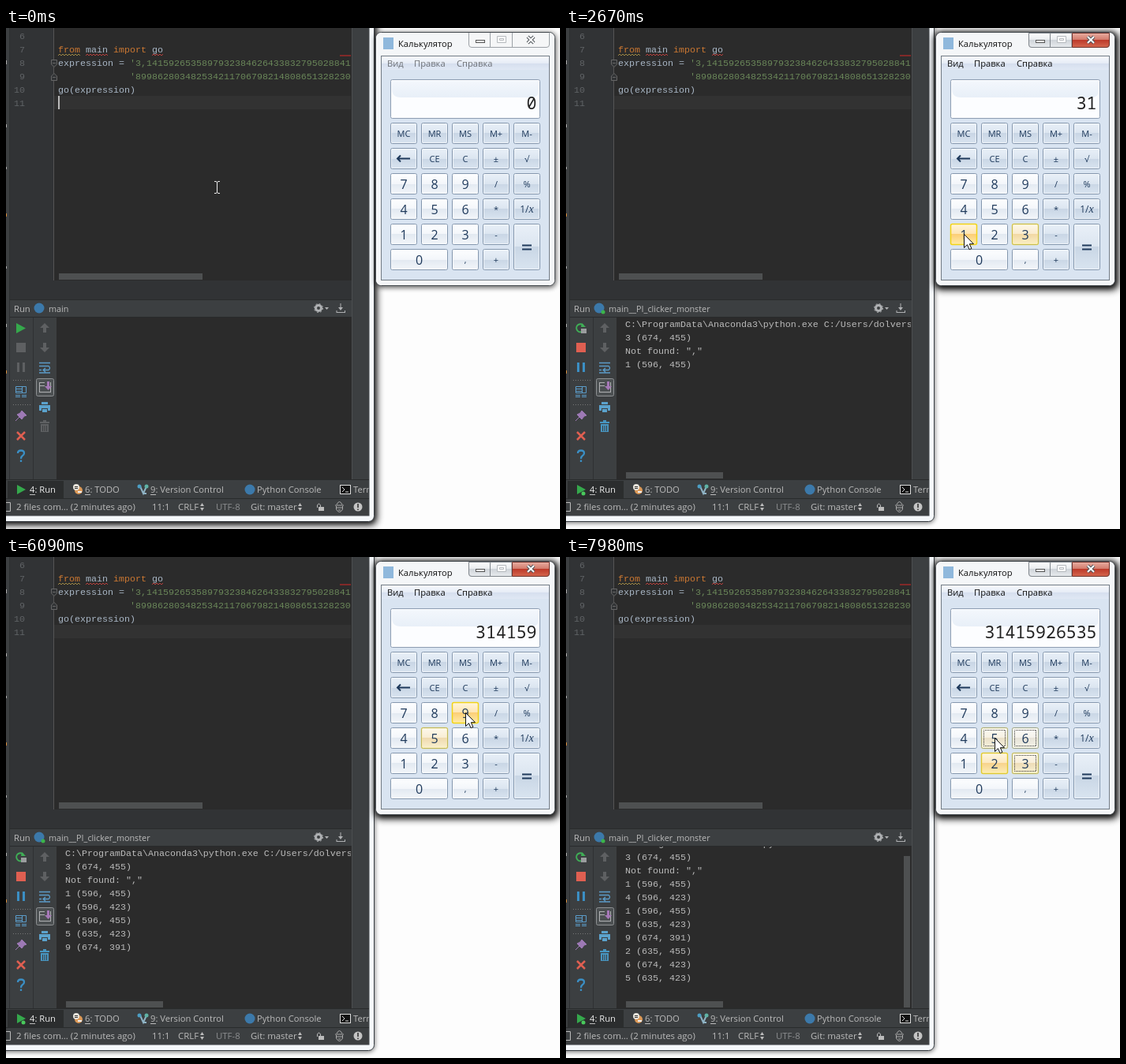
An HTML page for the animation above (8000 ms loop, 702 px wide and 635 px high).

```html
<!DOCTYPE html>
<html lang="ru">
<head>
<meta charset="utf-8">
<title>Calculator clicker</title>
<style>
html, body { margin: 0; width: 100%; height: 100%; overflow: hidden; background: #fdfdfd; }
svg { display: block; }
text { white-space: pre; }
.code { font: 11.667px "Liberation Mono", monospace; fill: #a9b7c6; }
.ui { font: 11.2px "Open Sans", "Noto Sans", sans-serif; fill: #bbb; }
.menu { font: 11.2px "Open Sans", "Noto Sans", sans-serif; fill: #111; }
.key { font: 11px "Open Sans", "Noto Sans", sans-serif; fill: #1e395b; text-anchor: middle; }
.digit { font-size: 16px; }
.display { font: 21.5px "Noto Sans Mono", monospace; fill: #222; text-anchor: end; }
.num { fill: #606366; text-anchor: end; }
.kw { fill: #cc7832; }
.str { fill: #6a8759; }
.out { fill: #bbb; }
.line { fill: none; stroke-width: 1; }
</style>
</head>
<body>
<svg id="stage" width="702" height="635" viewBox="0 0 702 635">
  <defs>
    <linearGradient id="digitFill" x2="0" y2="1">
      <stop offset="0" stop-color="#fdfeff"/><stop offset=".5" stop-color="#f3f6fa"/>
      <stop offset=".5" stop-color="#e2e9f1"/><stop offset="1" stop-color="#f3f6fa"/>
    </linearGradient>
    <linearGradient id="funcFill" x2="0" y2="1">
      <stop offset="0" stop-color="#e9f0f8"/><stop offset=".5" stop-color="#dbe5f0"/>
      <stop offset=".5" stop-color="#c9d6e5"/><stop offset="1" stop-color="#d9e4f0"/>
    </linearGradient>
    <linearGradient id="hotFill" x2="0" y2="1">
      <stop offset="0" stop-color="#fff5dc"/><stop offset=".48" stop-color="#fee5b2"/>
      <stop offset=".5" stop-color="#fcce76"/><stop offset="1" stop-color="#ffeca8"/>
    </linearGradient>
    <linearGradient id="menuFill" x2="0" y2="1">
      <stop offset="0" stop-color="#f7f9fd"/><stop offset=".5" stop-color="#e6ecf6"/>
      <stop offset=".5" stop-color="#d5deee"/><stop offset="1" stop-color="#e0e8f4"/>
    </linearGradient>
    <linearGradient id="gloss" x2="0" y2="1">
      <stop offset="0" stop-color="#f3f7fc"/><stop offset="1" stop-color="#e8eff8"/>
    </linearGradient>
    <linearGradient id="closeFill" x2="0" y2="1">
      <stop offset="0" stop-color="#e9aea2"/><stop offset=".48" stop-color="#d1796a"/>
      <stop offset=".5" stop-color="#bd3a2a"/><stop offset="1" stop-color="#d4674f"/>
    </linearGradient>
    <linearGradient id="glass" x2="0" y2="1">
      <stop offset="0" stop-color="#fff"/><stop offset=".5" stop-color="#e6e9ec"/>
      <stop offset=".5" stop-color="#cfd4d9"/><stop offset="1" stop-color="#e8ebee"/>
    </linearGradient>
    <filter id="nearBlur" x="-20%" y="-20%" width="140%" height="140%"><feGaussianBlur stdDeviation="3"/></filter>
    <filter id="farBlur" x="-20%" y="-20%" width="140%" height="140%"><feGaussianBlur stdDeviation="5"/></filter>
    <clipPath id="editorClip"><rect width="437" height="320"/></clipPath>
    <clipPath id="consoleClip"><rect x="64" y="367" width="373" height="205"/></clipPath>
    <clipPath id="ideClip"><rect width="460" height="618"/></clipPath>
  </defs>
  <rect width="702" height="635" fill="#fdfdfd"/>

  <g id="ide">
    <rect x="-20" y="-20" width="487" height="647" rx="8" opacity=".6" filter="url(#nearBlur)"/>
    <rect id="ideGlow" x="-20" y="-20" width="490" height="650" rx="8" filter="url(#farBlur)"/>
    <rect x="-20" y="-20" width="486.500" height="645.500" rx="7" fill="#f5f8fb" stroke="#383d42"/>
    <rect x="-1" y="-1" width="461" height="619" fill="#3c3f41" stroke="#44494d"/>
    <path d="M4.500 0V573" stroke="#2d2f30"/>
    <path d="M.500 41V46M.500 122V126M.500 176V179M.500 302V305M.500 375V379" stroke="#aaa"/>
    <path d="M.500 235V239M.500 434V438" stroke="#d28a3a"/>
    <rect x="5" width="56" height="320" fill="#313335"/>
    <rect x="61" width="377" height="320" fill="#2b2b2b"/>
    <rect x="5" y="320" width="433" height="24" fill="#313335"/>
    <path d="M5 344.500H438M5 366.500H438" stroke="#292b2c"/>
    <rect x="64" y="367" width="374" height="206" fill="#2b2b2b"/>
    <path d="M438.500 0V573" stroke="#4b4e50"/>
    <path d="M34.500 367V573" stroke="#2f3133"/>
    <path d="M60.500 0V320" stroke="#555"/>
    <rect x="61" y="86" width="376" height="17" fill="#323232"/>
    <rect x="67" y="311" width="182" height="8" fill="#4e5051"/>
    <path d="M423 35H437" stroke="#9e2927" stroke-width="1.500"/>
    <path d="M57.500 40.500H64.500V46L61 49.500 57.500 46ZM59 44.500H63M57.500 66.500H64.500V61L61 57.500 57.500 61ZM59 62.500H63" fill="#313335" stroke="#666"/>
    <g id="code" clip-path="url(#editorClip)"></g>
    <rect id="caret" x="66" y="86" width="2" height="17" fill="#bbb"/>

    <g id="header">
      <circle cx="42" cy="355" r="6.500" fill="#3c79aa"/>
      <circle id="liveDot" cx="47" cy="360" r="2.500" fill="#3cb54a"/>
      <circle cx="396" cy="355" r="3.500" class="line" stroke="#afb1b3" style="stroke-width:3"/>
      <circle cx="396" cy="355" r="5.500" class="line" stroke="#afb1b3" stroke-dasharray="2 2.320"/>
      <path d="M404 354H409L406.500 357Z" fill="#afb1b3"/>
      <path d="M424 349V356M419 360.500H430M419 358V361M429.500 358V361" class="line" stroke="#afb1b3"/>
      <path d="M421 354H427L424 358Z" fill="#afb1b3"/>
    </g>

    <g id="idleIcons">
      <path d="M13 374L25 380.500 13 387Z" fill="#35a84c"/>
      <path d="M13 399H25V411H13ZM14 424H17V436H14ZM21 424H24V436H21Z" fill="#5e6062"/>
    </g>
    <g id="liveIcons">
      <path d="M22 377A5 5 0 1 0 20 385" fill="none" stroke="#3fae56" stroke-width="2"/>
      <path d="M20 374L25 379H19Z" fill="#3fae56"/><rect x="19" y="381" width="7" height="6" fill="#9a9c9e"/>
      <rect x="13" y="399" width="12" height="12" fill="#df5f51"/>
      <path d="M14 424H17V436H14ZM21 424H24V436H21Z" fill="#3b8fc4"/>
    </g>
    <path d="M9 446.500H31M9 477.500H31" stroke="#777" stroke-dasharray="1 2"/>
    <path d="M12.500 454.500H25.500V462.500H12.500ZM12 457.500H20M12 460.500H20M20.500 455V462M12 465.500H18M20 465.500H26M12 467.500H18M20 467.500H26" class="line" stroke="#5b9cc9"/>
    <path d="M20 485L26 491 23 492 20 496 14 490 18 488ZM17 493L12 498" fill="#9d79b5" stroke="#9d79b5"/>
    <path d="M14 512L24 522M24 512L14 522" stroke="#df5f51" stroke-width="2.500"/>
    <path d="M15 539Q15 535.500 19 535.500T23 539Q23 541 20.500 542.500 19 543.500 19 546M19 547.500V550" fill="none" stroke="#3b8fc4" stroke-width="2.300"/>
    <path d="M49 374L55 380H51V386H47V380H43ZM49 411L55 405H51V399H47V405H43Z" fill="#5e6062"/>
    <path d="M42 424.500H56M42 428.500H54Q57 431 54 433.500H48M42 433.500H45M42 437H56M50 431L47 433.500 50 436" fill="none" stroke="#5b9cc9" stroke-width="1.300"/>
    <rect x="38.500" y="444.500" width="22" height="22" rx="2" fill="#4c5052" stroke="#8f9294"/>
    <path d="M43 449.500H49M43 453.500H49M43 461.500H56M42.500 449V462M56.500 449V462" class="line" stroke="#b0b2b4"/>
    <path d="M52 448H55V454H58L53.500 459 49 454H52Z" fill="#a678b8"/>
    <path d="M45 474H53V477H45ZM42 478H56V485H53V482H45V485H42ZM46 483H52V487H46Z" fill="#5ba2cc"/>
    <path id="trash" d="M43 499H47V497H51V499H55V501H43ZM44 502H54V512H44Z"/>
    <path d="M46.500 504V511M49 504V511M51.500 504V511" stroke="#3c3f41"/>

    <g id="console" clip-path="url(#consoleClip)"><g id="output"></g></g>
    <rect id="hBar" x="76" y="563" width="123" height="8" fill="#4e5051"/>
    <rect id="vBar" x="428" y="379" width="8" height="192" fill="#4e5051"/>

    <g id="tabs" clip-path="url(#ideClip)">
      <path d="M0 572.500H460M0 596.500H460" stroke="#292b2c"/>
      <rect x="2" y="574" width="71" height="22" fill="#2b2d2e"/>
      <path d="M14 579L25 585 14 591Z" fill="#35a84c"/>
      <circle id="tabDot" cx="22" cy="590" r="2.500" fill="#49c95c"/>
      <circle cx="92" cy="586" r="5" fill="#dd9a58"/><circle cx="89" cy="582" r="4" fill="#e8e4dc"/>
      <path d="M87 581.500H91M87 583.500H91" stroke="#333"/>
      <path d="M91 588H96" stroke="#eee" stroke-width="2"/>
      <path d="M170 581L174 590 178 581M174 590H178" class="line" stroke="#8fb3c4" style="stroke-width:2"/>
      <circle cx="169" cy="581" r="2.500" fill="#4c9ec4"/><circle cx="178" cy="581" r="2.500" fill="#5fb3a6"/>
      <circle cx="309" cy="585" r="6.500" fill="#3c79aa"/>
      <rect x="423.500" y="579.500" width="13" height="11" fill="#111" stroke="#ddd"/>
      <path d="M426 582L429 585 426 588M430 588H434" class="line" stroke="#ddd"/>
      <path d="M30 591.500H37M100 591.500H107M183 591.500H190" stroke="#bbb"/>
      <path d="M0 601.500H5.500V612.500H0" class="line" stroke="#bbb"/>
      <path d="M246 606L248.500 602 251 606ZM246 608H251L248.500 612ZM370 606L372.500 602 375 606ZM370 608H375L372.500 612Z" fill="#bbb"/>
      <path d="M396 607H403V612H396Z" fill="#bbb"/><path d="M394.500 608V605Q396.500 601 398.500 605V607" class="line" stroke="#bbb"/>
      <path d="M417 605H428M419 604Q422.500 597 426 604M418.500 606V610Q422.500 617 426.500 610V606M419 608H426M421 611H424" class="line" stroke="#aaa"/>
      <circle cx="446" cy="607" r="5.500" fill="#c4c4c4"/><path d="M446 603V608M446 609.500V611" stroke="#333" stroke-width="1.600"/>
    </g>
  </g>

  <g id="calc">
    <rect x="468" y="6" width="229" height="323" rx="8" opacity=".65" filter="url(#nearBlur)"/>
    <rect id="calcGlow" x="467" y="5" width="233" height="327" rx="8" filter="url(#farBlur)"/>
    <rect x="468.500" y="5.500" width="227" height="321" rx="7" fill="#f4f6f8" stroke="#42484e"/>
    <rect x="469.500" y="6.500" width="225" height="319" rx="6" class="line" stroke="#fff"/>
    <rect x="478" y="12" width="13" height="15" fill="#8fb8dc"/>
    <path d="M586.500 6V21Q586.500 24.500 590 24.500H685Q688.500 24.500 688.500 21V6M613.500 6V24M641.500 6V24" fill="#f5f6f7" stroke="#9ca1a6"/>
    <g id="activeCaption">
      <path d="M586.500 6.500V21Q586.500 24.500 590 24.500H641V6.500Z" fill="url(#glass)" stroke="#80868c"/>
      <path d="M641.500 6.500V24.500H685Q688.500 24.500 688.500 21V6.500Z" fill="url(#closeFill)" stroke="#6e342d"/>
      <path d="M613.500 6V24" stroke="#80868c"/>
    </g>
    <rect x="595.500" y="15.500" width="11" height="3" fill="#fff" stroke="#555"/>
    <path d="M622.500 10.500H633.500V18.500H622.500ZM625.500 13.500H630.500V15.500H625.500Z" fill="#fff" stroke="#b5b9bd"/>
    <path d="M661 11L669 19M669 11L661 19" stroke="#50555b" stroke-width="4"/>
    <path d="M661 11L669 19M669 11L661 19" stroke="#fff" stroke-width="2"/>
    <rect x="475.500" y="35.500" width="213" height="284" fill="#d9e4f1" stroke="#727b85"/>
    <rect x="476" y="36" width="212" height="17" fill="url(#menuFill)"/>
    <g id="menu"></g>
    <rect x="487.500" y="65.500" width="189" height="49" rx="2" fill="#fcfdff" stroke="#8d9db2"/>
    <path d="M489 67H675V79Q675 88 666 88H500Q489 88 489 77Z" fill="url(#gloss)"/>
    <text id="display" class="display" x="672.500" y="103"></text>
    <g id="keys"></g>
  </g>

  <g id="beam" fill="none">
    <path d="M264 194.500H266.500L267.500 196 268.500 194.500H271M267.500 196V208M264 209.500H266.500L267.500 208 268.500 209.500H271" stroke="#eee"/>
  </g>
  <path id="arrow" d="M0 0V17L4 13.200 6.600 19.200 9.400 18 6.800 12.200H12Z" fill="#fff" stroke="#111"/>
</svg>
<script>
const LOOP = 8000, ACTIVATE = 1110, RISE = 150, FADE = 950, FOCUS = 7800;
const $ = id => document.getElementById(id);
const escape = s => s.replace(/&/g, '&amp;').replace(/</g, '&lt;');
const text = (x, y, s, cls, extra = '') => `<text x="${x}" y="${y}" class="${cls}" ${extra}>${escape(s)}</text>`;
const add = (id, markup) => $(id).insertAdjacentHTML('beforeend', markup);
const show = (id, on) => { $(id).style.display = on ? '' : 'none'; };

// Editor
const zigzag = (x, width, color) => {
  let d = `M${x} 35`;
  for (let i = 2; i <= width; i += 2) d += `L${x + i} ${i % 4 ? 33 : 35}`;
  return `<path d="${d}" class="line" stroke="${color}"/>`;
};
for (let n = 6; n <= 11; n++) add('code', text(24, 14 + (n - 6) * 17, String(n), 'code num'));
add('code', [
  text(66, 31, 'from', 'code kw'), text(101, 31, 'main', 'code'),
  text(136, 31, 'import', 'code kw'), text(185, 31, 'go', 'code'),
  zigzag(66, 28, '#a08a45'), zigzag(101, 28, '#bc3f3c'), zigzag(185, 14, '#bc3f3c'),
  text(66, 48, 'expression =', 'code'),
  text(157, 48, "'3,1415926535897932384626433832795028841", 'code str'),
  text(157, 65, "'899862803482534211706798214808651328230", 'code str'),
  text(66, 82, 'go(expression)', 'code')
].join(''));

add('header', text(10, 360, 'Run', 'ui') + text(54, 360, '', 'ui', 'id="runName" style="font-size:10.800px"'));
[[30, '4: Run', '#eee'], [100, '6: TODO'], [183, '9: Version Control'], [318, 'Python Console'], [440, 'Terminal']]
  .forEach(([x, s, color = '#bbb']) => add('tabs', text(x, 589, s, 'ui', `style="fill:${color}"`)));
[[13, '2 files com... (2 minutes ago)'], [185, '11:1'], [218, 'CRLF'], [266, 'UTF-8', '#8b8d8f'], [310, 'Git: master']]
  .forEach(([x, s, color = '#bbb']) => add('tabs', text(x, 611, s, 'ui', `style="font-size:11.400px;fill:${color}"`)));

// Calculator
add('calc', text(497, 24, 'Калькулятор', 'menu'));
[[483, 'Вид'], [517, 'Правка'], [571, 'Справка']].forEach(([x, s]) => add('menu', text(x, 49, s, 'menu')));

const addKey = (label, col, row, width = 34, height = 27) => {
  const x = 487 + col * 39, y = 120 + row * 32, cx = x + width / 2, cy = y + height / 2;
  const isDigit = /^\d$/.test(label), white = isDigit || label === ',';
  const rect = (inset, attrs) => `<rect x="${x + inset}" y="${y + inset}" width="${width - 2 * inset}" height="${height - 2 * inset}" ${attrs}/>`;
  let m = rect(.5, `rx="2" fill="url(#${white ? 'digitFill' : 'funcFill'})" stroke="#8497ae"`)
        + rect(1.5, 'rx="1" fill="none" stroke="#fff" opacity=".6"');
  if (isDigit) m += rect(.5, `id="hot${label}" rx="2" fill="url(#hotFill)" stroke="#f2d316" stroke-width="1.500"`)
                  + rect(3.5, `id="focus${label}" fill="none" stroke="#333" stroke-dasharray="1 1" stroke-dashoffset=".5"`);
  if (label === '←') {
    m += `<path d="M${cx - 8} ${cy}H${cx + 8}M${cx - 4} ${cy - 4}L${cx - 8} ${cy}L${cx - 4} ${cy + 4}" fill="none" stroke="#1e395b" stroke-width="2"/>`;
  } else if (label === '=') {
    m += `<path d="M${cx - 6} ${cy - 2}H${cx + 6}M${cx - 6} ${cy + 3}H${cx + 6}" stroke="#1e395b" stroke-width="2"/>`;
  } else if (label === '1/x') {
    m += `<text x="${cx}" y="${cy + 4}" class="key" style="font-size:12px">1/<tspan font-family="Liberation Serif, serif" font-style="italic" font-size="14">x</tspan></text>`;
  } else {
    m += text(cx, cy + (isDigit ? 6.5 : 4.5), label, isDigit ? 'key digit' : 'key');
  }
  add('keys', m);
};
['MC MR MS M+ M-', '← CE C ± √', '7 8 9 / %', '4 5 6 * 1/x', '1 2 3 -']
  .forEach((line, row) => line.split(' ').forEach((label, col) => addKey(label, col, row)));
addKey('=', 4, 4, 34, 59);
addKey('0', 0, 5, 73);
addKey(',', 2, 5);
addKey('+', 3, 5);

// Timeline
const clicks = [
  [1110, 3], [2310, 1], [3390, 4], [3500, 1], [4560, 5], [5640, 9],
  [6720, 2], [7800, 6], [7850, 5], [7910, 3], [7980, 5]
].map(([at, digit]) => ({ at, digit }));
const center = d => ({ x: 504 + (d - 1) % 3 * 39, y: 262 - Math.floor((d - 1) / 3) * 32 });
const report = d => `${d} (${center(d).x + 92}, ${center(d).y + 193})`;
const prints = [
  [90, 'C:\\ProgramData\\Anaconda3\\python.exe C:/Users/dolvers/'],
  [1750, report(3)], [1750, 'Not found: ","'], [2490, report(1)], [3480, report(4)], [3570, report(1)],
  [4740, report(5)], [5820, report(9)], [6900, report(2)], [7890, report(6)], [7890, report(5)]
];
prints.forEach(([, s], i) => add('output', text(75, 379 + i * 17, s, 'code out', `id="print${i}"`)));

// The screen refreshes in bursts: quick steps of 90 ms, then slow ones of 180 ms.
const bursts = [[1110, 5, 0], [1750, 1, 0], [2310, 5, 3], [3390, 3, 4], [4560, 4, 4], [5640, 4, 4], [6720, 4, 4], [7800, 3, 0]];
const steps = [0, 90, 550];
for (const [start, quick, slow] of bursts) {
  for (let i = 0; i < quick + slow; i++) steps.push(start + 90 * i + 90 * Math.max(0, i - quick + 1));
}

function heat(digit, t) {
  let level = 0;
  clicks.forEach((click, i) => {
    if (click.at > t) return;
    const end = Math.min(t, i + 1 < clicks.length ? clicks[i + 1].at : LOOP);
    const span = end - click.at;
    level = click.digit === digit ? Math.min(1, level + span / RISE) : Math.max(0, level - span / FADE);
  });
  return level;
}

function render(time) {
  const t = steps.filter(s => s <= time).pop();
  const running = t >= 90, active = t >= ACTIVATE;
  const done = clicks.filter(c => c.at <= t);

  show('caret', t < 550);
  show('idleIcons', !running);
  ['liveIcons', 'liveDot', 'tabDot', 'hBar'].forEach(id => show(id, running));
  $('trash').setAttribute('fill', running ? '#4795c0' : '#5e6062');
  $('runName').textContent = running ? 'main__PI_clicker_monster' : 'main';

  prints.forEach(([at], i) => show('print' + i, t >= at));
  const scrolled = t >= 7890;
  show('vBar', scrolled);
  $('output').setAttribute('transform', `translate(0 ${scrolled ? -12 : 0})`);

  const focus = Math.max(0, Math.min(1, (t - ACTIVATE + 90) / 270));
  $('activeCaption').style.opacity = focus;
  $('calcGlow').style.opacity = .85 * focus;
  $('ideGlow').style.opacity = .85 * (1 - focus);
  $('menu').style.opacity = active ? 1 : .55;
  $('display').textContent = done.map(c => c.digit).join('') || '0';
  for (let d = 0; d <= 9; d++) {
    $('hot' + d).style.opacity = heat(d, t);
    show('focus' + d, done.some(c => c.digit === d && c.at >= FOCUS));
  }

  show('beam', !active);
  show('arrow', active);
  if (active) {
    const { x, y } = center(done[done.length - 1].digit);
    $('arrow').setAttribute('transform', `translate(${x + .5} ${y - .5})`);
  }
}

const started = performance.now();
function tick() {
  render((performance.now() - started) % LOOP);
  requestAnimationFrame(tick);
}
tick();
</script>
</body>
</html>
```
